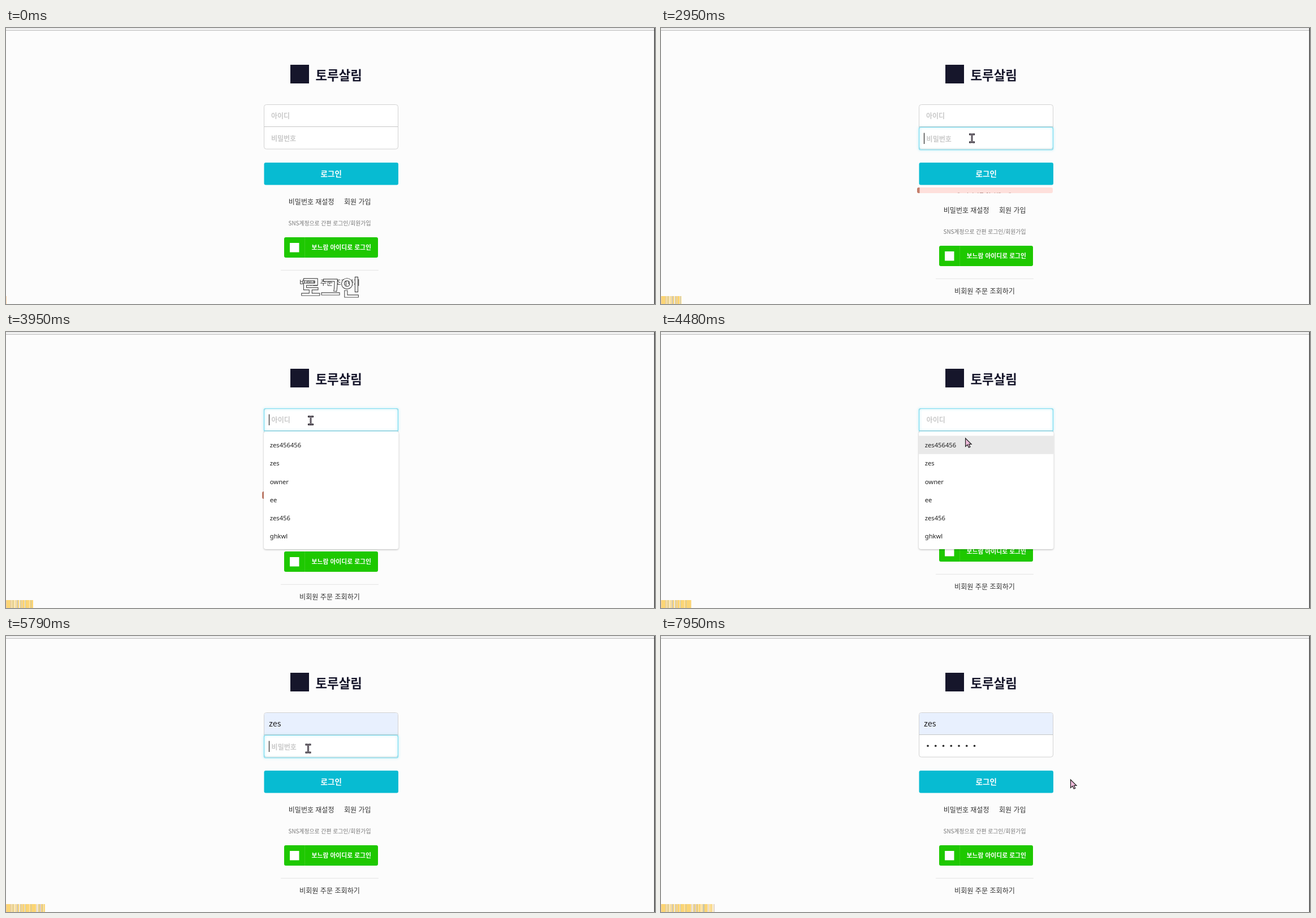
Recreate the animation shown at these times as an HTML page. Size 1148 by 488 pixels, loop 8 s.

```html
<!DOCTYPE html>
<html lang="ko">
<head>
<meta charset="utf-8">
<title>로그인</title>
<style>
  html, body { margin: 0; width: 100%; height: 100%; overflow: hidden; background: #fcfcfc; }
  svg { display: block; width: 1148px; height: 488px; font: 12px "Noto Sans CJK KR", "Noto Sans CJK", sans-serif; }
  .mid { text-anchor: middle; }
  .hint { fill: #c9c9c9; font-weight: 700; }
  .field { fill: #fff; stroke: #d2d2d2; }
  .focus { fill: none; stroke: #7adcf0; stroke-width: 1.2; filter: drop-shadow(0 0 2px #7fdff3); }
  .link { fill: #333; }
  .menu text { font: 11.2px "Noto Sans", sans-serif; fill: #222; }
  #menu { transform-origin: 575px 280px; }
  .panel { fill: #fff; filter: drop-shadow(0 1px 1.5px #0004); }
</style>
</head>
<body>
<svg viewBox="0 0 1148 488">
  <defs>
    <clipPath id="errorClip"><rect id="errorMask" x="453" y="282" width="240" height="28" rx="3"/></clipPath>
    <clipPath id="barClip"><rect id="barMask" y="474" width="1" height="14"/></clipPath>
  </defs>
  <rect width="1148" height="488" fill="#fcfcfc"/>
  <path d="M0 .5H1148" stroke="#ddd"/>
  <path d="M0 4H1148" stroke="#aaa"/>
  <path d="M1147.3 0V488" stroke="#333" stroke-width="1.4"/>

  <rect x="503" y="65" width="33" height="33" fill="#16162b"/>
  <text x="547.5" y="92" font-size="22.4" font-weight="900" fill="#16162b">토루살림</text>

  <rect class="field" x="456.5" y="135.5" width="237" height="78.5" rx="4"/>
  <path id="filled" d="M457 174V140a4 4 0 0 1 4-4H689a4 4 0 0 1 4 4V174Z" fill="#e8f0fe"/>
  <path d="M456.5 174.5H693.5" stroke="#c6c6c6"/>
  <text id="idHint" class="hint" x="469" y="160">아이디</text>
  <text id="pwHint" class="hint" x="469" y="199.5">비밀번호</text>
  <rect id="idFocus" class="focus" x="456.5" y="135.5" width="237" height="39.5" rx="2"/>
  <rect id="pwFocus" class="focus" x="456.5" y="175.5" width="237" height="40" rx="3"/>
  <text id="idText" x="465" y="160" font-size="14.5" fill="#222">zes</text>
  <path id="squiggle" d="M465 163q1.4-2.4 2.8 0t2.8 0t2.8 0t2.8 0t2.8 0t2.8 0t2.8 0t2.4 0" fill="none" stroke="#d33"/>
  <g id="dots" fill="#222"></g>
  <path id="caret" d="M0 0V19.5" stroke="#222" stroke-width="1.2"/>

  <rect x="456.5" y="238" width="237.5" height="39.5" rx="3" fill="#07bbd2"/>
  <text class="mid" x="575.2" y="263" font-size="13.5" font-weight="700" fill="#fff">로그인</text>

  <g id="error" clip-path="url(#errorClip)">
    <rect x="453" y="282" width="240" height="28" fill="#fee0dc"/>
    <rect x="453" y="282" width="4.5" height="28" fill="#c47e6b"/>
    <circle cx="526.5" cy="295.5" r="4" fill="#7c4a42"/>
    <text x="535.5" y="300" font-size="9.8" fill="#7c4a42">아이디를 입력해주세요</text>
  </g>

  <g id="lower">
    <text class="link" x="499.8" y="311.5">비밀번호 재설정</text>
    <text class="link" x="598" y="311.5">회원 가입</text>
    <text class="mid" x="572.5" y="348.7" font-size="9.85" fill="#777">SNS계정으로 간편 로그인/회원가입</text>
    <rect x="492" y="370" width="166" height="36" rx="3" fill="#1ec800"/>
    <path d="M528.5 370V406" stroke="#38cf1d"/>
    <rect x="502" y="380" width="16.5" height="16.5" fill="#fff"/>
    <text class="mid" x="593.3" y="392" font-size="10.8" font-weight="700" fill="#fff">보느람 아이디로 로그인</text>
    <path d="M486 428.3H659" stroke="#e4e4e4"/>
    <text class="mid link" x="572.5" y="455" font-size="12.1">비회원 주문 조회하기</text>
  </g>

  <g id="menu" class="menu">
    <rect class="panel" x="456" y="176" width="238.5" height="208" rx="4"/>
    <rect id="hover" x="456" width="238.5" height="32.3" fill="#e9e9e9"/>
  </g>

  <text id="caption" class="mid" x="574" y="472.5" font-size="38.2" font-weight="700" fill="#fcfcfc" stroke="#222" stroke-width=".9">로그인</text>
  <g id="bar" clip-path="url(#barClip)"></g>

  <g id="cursor">
    <g id="beam" fill="none">
      <path d="M-5-7H-1.5L0-6 1.5-7H5M0-6V6M-5 7H-1.5L0 6 1.5 7H5" stroke="#1b1720" stroke-width="2.8"/>
      <path d="M-4-7H-1.5L0-6 1.5-7H4M0-6V6M-4 7H-1.5L0 6 1.5 7H4" stroke="#d9ccd6" stroke-width=".8"/>
    </g>
    <path id="arrow" d="M.5.5V15L4 11.8 6.3 16.8 8.8 15.7 6.6 10.9H11Z" fill="#efbcdb" stroke="#222" stroke-width="1.2"/>
  </g>
</svg>
<script>
const LOOP = 8000, DOTS = 7, ROW = 32.25;
const $ = id => document.getElementById(id);
const NS = 'http://www.w3.org/2000/svg';

function add(parent, tag, attrs, text = '') {
  const node = document.createElementNS(NS, tag);
  for (const key in attrs) node.setAttribute(key, attrs[key]);
  node.textContent = text;
  parent.append(node);
  return node;
}

['zes456456', 'zes', 'owner', 'ee', 'zes456', 'ghkwl'].forEach((name, i) =>
  add($('menu'), 'text', { x: 466.8, y: 204 + i * ROW }, name));

const dots = Array.from({ length: DOTS }, (_, i) =>
  add($('dots'), 'circle', { cx: 472 + i * 13.75, cy: 194.3, r: 1.8 }));

// Progress bar: amber with irregular pale and grey columns
let seed = 7;
const random = () => (seed = seed * 16807 % 2147483647) / 2147483647;
const tints = ['#fbe9c0', '#d8cdd0', '#f3ead8', '#c9c6a8'];
for (let x = 0; x < 96; x++) {
  const plain = x < 7 || random() < .58;
  add($('bar'), 'rect', {
    x, y: 474, width: 1.05, height: 14,
    fill: x ? plain ? '#fbd575' : tints[random() * 4 | 0] : '#f9cda0'
  });
}

// Cursor waypoints: time, x, y
const path = [
  [480, 1052, 492], [780, 842, 435], [1000, 730, 390], [1300, 577, 237], [1550, 546, 160],
  [1650, 543.5, 155.5], [2300, 549, 156], [2600, 549, 157], [2780, 550, 195], [3350, 550, 195],
  [3700, 539, 156.5], [4250, 539, 156.5], [4500, 538, 190], [4750, 537, 217], [5200, 537, 217],
  [5550, 534.5, 199], [7380, 534.5, 199], [7460, 575, 210], [7730, 724, 253.5]
];

const between = (t, a, b) => t >= a && t < b;
const ramp = (t, a, b) => Math.min(1, Math.max(0, (t - a) / (b - a)));
const show = (id, on) => $(id).style.display = on ? '' : 'none';

function cursorAt(t) {
  const i = path.findIndex(p => p[0] > t);
  if (i < 0) return path.at(-1).slice(1);
  if (i === 0) return null;
  const [a, b] = [path[i - 1], path[i]];
  const k = ramp(t, a[0], b[0]);
  return [1, 2].map(n => a[n] + (b[n] - a[n]) * k);
}

function drawCursor(t, menuOpen) {
  const pos = cursorAt(t);
  show('cursor', pos);
  if (!pos) return;
  const [x, y] = pos;
  const inField = between(x, 456, 694) && between(y, 135, menuOpen ? 175 : 214);
  $('cursor').setAttribute('transform', `translate(${x} ${y})`);
  show('beam', inField);
  show('arrow', !inField);
}

function drawFields(t) {
  const idFocus = between(t, 2500, 2800) || between(t, 3810, 5700);
  const pwFocus = between(t, 2800, 3810) || between(t, 5700, 7700);
  const filled = t >= 4620;
  const typed = Math.min(DOTS, Math.max(0, Math.floor((t - 5950) / 170)));
  const nudge = on => on ? 'translate(.6 1)' : '';

  show('idFocus', idFocus);
  show('pwFocus', pwFocus);
  show('filled', filled);
  show('idText', filled);
  show('idHint', !filled);
  show('squiggle', between(t, 4940, 5700));
  show('pwHint', !typed);
  $('idHint').setAttribute('transform', idFocus ? 'translate(.6 0)' : '');
  $('pwHint').setAttribute('transform', nudge(pwFocus));
  $('dots').setAttribute('transform', nudge(pwFocus));
  dots.forEach((dot, i) => dot.style.display = i < typed ? '' : 'none');

  const since = [2500, 2800, 3810, 4940, 5700].findLast(s => s <= t);
  const typing = between(t, 5950, 7200);
  show('caret', (idFocus || pwFocus) && (typing || (t - since) % 1060 < 530));
  const caretX = pwFocus ? 465.5 + typed * 13.75 : t >= 4940 ? 487.5 : 465.5;
  $('caret').setAttribute('transform', `translate(${caretX} ${pwFocus ? 185.5 : 145.5})`);
}

function drawError(t) {
  const open = ramp(t, 2860, 3110) - ramp(t, 3810, 4070);
  const height = Math.round(28 * open);
  show('error', height > 0);
  $('errorMask').setAttribute('height', height);
  $('lower').setAttribute('transform', `translate(0 ${height + Math.min(5, height)})`);
}

function drawMenu(t) {
  const fade = ramp(t, 4940, 5100);
  const open = between(t, 3880, 5100);
  show('menu', open);
  $('menu').style.opacity = 1 - fade;
  $('menu').style.transform = `scale(${1 - .04 * fade})`;
  show('hover', t >= 4400);
  $('hover').setAttribute('y', t < 4740 ? 183.5 : 215.8);
  return open;
}

function draw() {
  const t = performance.now() % LOOP;
  show('caption', t < 780);
  $('barMask').setAttribute('width', 1 + Math.floor(t / 84));
  drawFields(t);
  drawError(t);
  drawCursor(t, drawMenu(t));
  requestAnimationFrame(draw);
}
draw();
</script>
</body>
</html>
```
